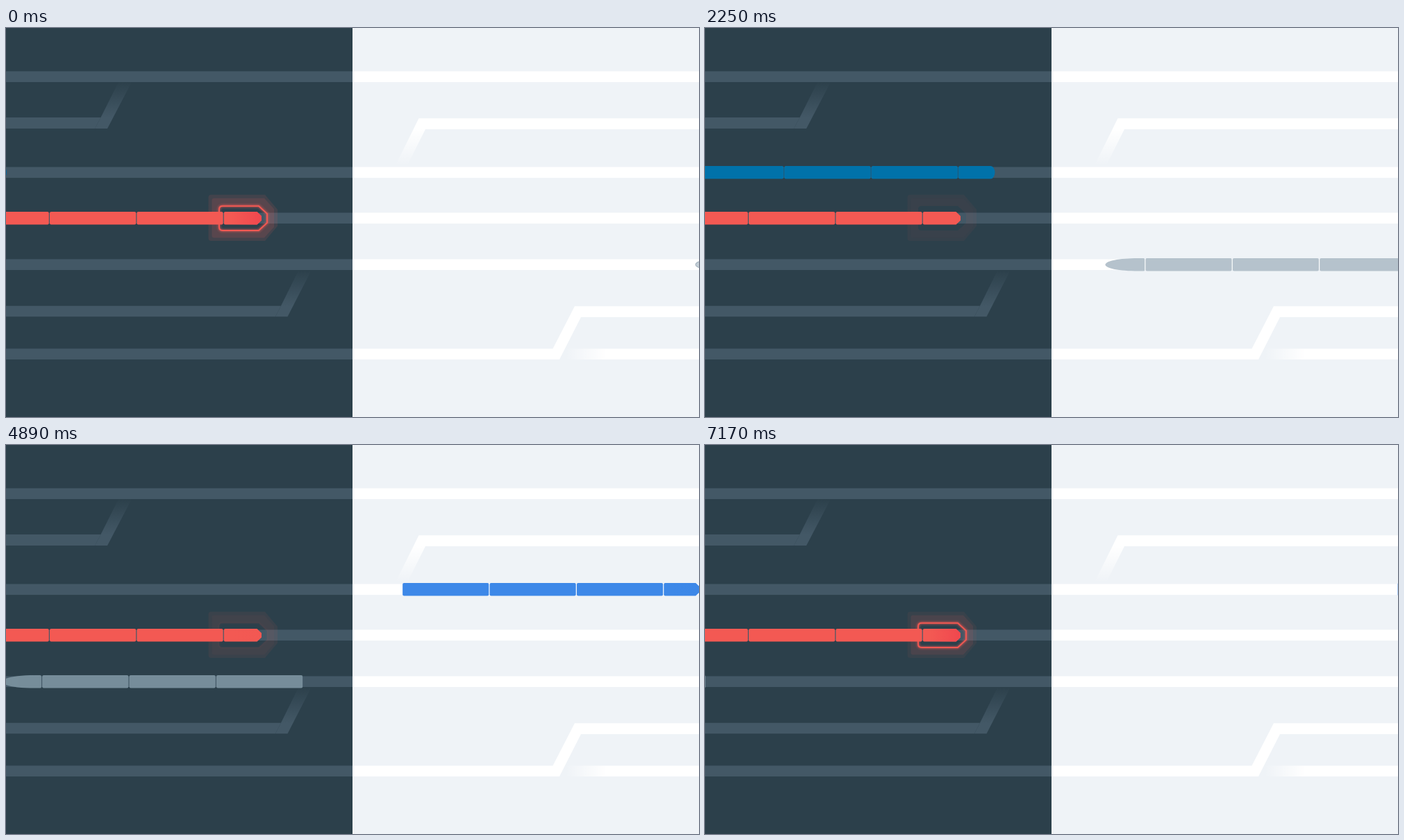
An HTML page that plays this animation: 998 px wide and 561 px high, repeating every 7.2 s.

```html
<!DOCTYPE html>
<html lang="en">
<head>
<meta charset="utf-8">
<title>Trains</title>
<style>
  html, body { margin: 0; width: 100%; height: 100%; overflow: hidden; background: #eff3f7; }
  svg { display: block; width: 998px; height: 561px; }
</style>
</head>
<body>
<svg viewBox="0 0 998 561" xmlns="http://www.w3.org/2000/svg">
  <defs>
    <clipPath id="left"><rect width="499" height="561"/></clipPath>
    <clipPath id="right"><rect x="499" width="499" height="561"/></clipPath>
    <linearGradient id="fadeA" gradientUnits="userSpaceOnUse" x1="0" y1="78" x2="0" y2="129">
      <stop stop-color="#435866" stop-opacity="0"/><stop offset="1" stop-color="#435866"/>
    </linearGradient>
    <linearGradient id="fadeB" gradientUnits="userSpaceOnUse" x1="0" y1="349" x2="0" y2="401">
      <stop stop-color="#435866" stop-opacity="0"/><stop offset="1" stop-color="#435866"/>
    </linearGradient>
    <linearGradient id="fadeC" gradientUnits="userSpaceOnUse" x1="0" y1="146" x2="0" y2="198">
      <stop stop-color="#fff"/><stop offset="1" stop-color="#fff" stop-opacity="0"/>
    </linearGradient>
    <linearGradient id="fadeD" gradientUnits="userSpaceOnUse" x1="806" y1="0" x2="864" y2="0">
      <stop stop-color="#fff" stop-opacity="0"/><stop offset="1" stop-color="#fff"/>
    </linearGradient>
    <linearGradient id="shadeRed">
      <stop offset=".2" stop-color="#f0474e" stop-opacity="0"/><stop offset="1" stop-color="#f0474e"/>
    </linearGradient>
    <linearGradient id="shadeBlue">
      <stop offset=".15" stop-color="#00609a" stop-opacity="0"/><stop offset="1" stop-color="#00609a"/>
    </linearGradient>
    <linearGradient id="shadeSky">
      <stop offset=".15" stop-color="#2f78d8" stop-opacity="0"/><stop offset="1" stop-color="#2f78d8"/>
    </linearGradient>
    <linearGradient id="shadeGray">
      <stop stop-color="#fff" stop-opacity=".22"/><stop offset=".9" stop-color="#fff" stop-opacity="0"/>
    </linearGradient>
    <filter id="blur" x="-20%" y="-30%" width="140%" height="160%"><feGaussianBlur stdDeviation="1.6"/></filter>
  </defs>

  <rect width="998" height="561" fill="#eff3f7"/>
  <rect width="499" height="561" fill="#2c404b"/>
  <g id="tracks"></g>

  <path fill="#435866" d="M0 129H136.5L128 145H0z"/>
  <path fill="url(#fadeA)" d="M136.5 129L162 78H181L146 145H128z"/>
  <path fill="#435866" d="M0 400.7H396L388 416.2H0z"/>
  <path fill="url(#fadeB)" d="M396 400.7L421.5 349H440L405.5 416.2H388z"/>
  <path fill="url(#fadeC)" d="M594.5 130.2H998V146H604L577 200H560z"/>
  <path fill="#fff" d="M499 462.4H787.5L819 401.3H998V417H828L797 478H499z"/>
  <path fill="url(#fadeD)" d="M806 462.4H998V478H800z"/>

  <g id="glow" fill="#f35953" fill-rule="evenodd">
    <path id="outer"/>
    <path id="mid"/>
    <g id="line" fill="none" stroke="#f35953">
      <path class="rim" stroke-width="4" opacity=".55" filter="url(#blur)"/>
      <path class="rim" stroke-width="1.9"/>
    </g>
  </g>
  <g id="trains"></g>
</svg>

<script>
const LOOP = 7200, STEP = 30, PULSE = 900, PITCH = 125.4;
const $ = id => document.getElementById(id);

$('tracks').innerHTML = [62.4, 200.5, 266.4, 333.4, 462.4].map(y =>
  `<rect y="${y}" width="499" height="15.6" fill="#435866"/>` +
  (y > 400 ? '' : `<rect x="499" y="${y}" width="499" height="15.6" fill="#fff"/>`)).join('');

// Pointed tag: left, top, right, bottom, corner radius, shoulder x, nose half height
function tag(l, t, r, b, c, s, n) {
  const m = (t + b) / 2;
  return `M${l + c} ${t}H${s}L${r} ${m - n}V${m + n}L${s} ${b}H${l + c}` +
    `Q${l} ${b} ${l} ${b - c}V${t + c}Q${l} ${t} ${l + c} ${t}z`;
}
const rim = tag(307, 256.8, 376, 292, 5, 364, 6.5);
document.querySelectorAll('.rim').forEach(p => p.setAttribute('d', rim));
$('outer').setAttribute('d', tag(291.5, 240.5, 391, 307, 4, 373, 12) + rim);
$('mid').setAttribute('d', tag(296.5, 245.5, 386, 302.5, 3, 372, 13) + rim);

// Noses sit at x = 0; cars trail to the left, or to the right for the grey train
const chamfer = w => `M${2 - w} 0H-6.5L0 6.2V12.4L-6.5 18.6H${2 - w}Q${-w} 18.6 ${-w} 16.6V2Q${-w} 0 ${2 - w} 0z`;
const round = 'M-50.4 0H-6Q-3.5 0 -2 2.5Q0 5.5 0 9.3Q0 13.1 -2 16.1Q-3.5 18.6 -6 18.6H-50.4Q-52.4 18.6 -52.4 16.6V2Q-52.4 0 -50.4 0z';
const bullet = 'M55 0H47C20 0 0 4 0 9.3C0 14.6 20 18.6 47 18.6H55Q56.7 18.6 56.7 16.9V1.7Q56.7 0 55 0z';

function train({ y, color, head, joint, dir, shade, edge = 'none', clip, link = '' }) {
  let cars = '';
  for (let i = 0; i < 3; i++) {
    const near = joint + PITCH * i + 0.6, w = PITCH - 1.2;
    cars += `<rect x="${dir > 0 ? -near - w : near}" width="${w}" height="18.6" rx="2"/>`;
  }
  return `<g clip-path="url(#${clip})"><g class="${shade === 'shadeGray' ? 'west' : shade === 'shadeRed' ? 'still' : 'east'}" data-y="${y}">
    ${link}<g fill="${color}">${cars}<path d="${head}"/></g>
    <path class="shade" d="${head}" fill="url(#${shade})" stroke="${edge}" stroke-width="1.3"/></g></g>`;
}

const blue = { y: 199, joint: 53, dir: 1 };
const gray = { y: 332, joint: 57.3, dir: -1, head: bullet, shade: 'shadeGray' };
const coupling = '<rect x="-425" y="2.5" width="415" height="13.6" fill="#0a608c" opacity=".6"/>';
$('trains').innerHTML = [
  { ...blue, color: '#0072aa', head: round, shade: 'shadeBlue', clip: 'left', link: coupling },
  { ...blue, color: '#3d88e8', head: chamfer(52.4), shade: 'shadeSky', clip: 'right' },
  { y: 265, joint: 54.8, dir: 1, color: '#f35953', head: chamfer(54.2), shade: 'shadeRed', clip: 'left' },
  { ...gray, color: '#768d9a', edge: '#6d8491', clip: 'left' },
  { ...gray, color: '#b5c2cc', edge: '#a9b7c2', clip: 'right' }
].map(train).join('');

const path = [[0, 0], [2700, 500], [4500, 926], [7200, 1431]];
function travel(t) {
  const i = path.findIndex(p => t < p[0]);
  const [t0, d0] = path[i - 1], [t1, d1] = path[i];
  return d0 + (d1 - d0) * (t - t0) / (t1 - t0);
}

// Full until the delay has passed, then eased out and in again
function pulse(t, delay) {
  if (t < delay) return 1;
  const k = Math.abs(1 - 2 * ((t - delay) / PULSE % 1));
  return k * k * (3 - 2 * k);
}

const groups = name => [...document.querySelectorAll('.' + name)];
const east = groups('east'), west = groups('west'), still = groups('still'), shades = groups('shade');
const place = (list, x) => list.forEach(g => g.setAttribute('transform', `translate(${x.toFixed(2)} ${g.dataset.y})`));
place(still, 368);

function draw(t) {
  const d = travel(t), beat = pulse(t, 0);
  place(east, 0.8 + d);
  place(west, 993.2 - d);
  shades.forEach(s => s.setAttribute('opacity', beat));
  $('line').setAttribute('opacity', beat);
  $('mid').setAttribute('opacity', 0.12 * pulse(t, 100));
  $('outer').setAttribute('opacity', 0.11 * pulse(t, 200));
}

const start = performance.now();
function tick() {
  const t = (performance.now() - start) % LOOP;
  draw(Math.floor(t / STEP) * STEP);
  requestAnimationFrame(tick);
}
draw(0);
requestAnimationFrame(tick);
</script>
</body>
</html>
```
